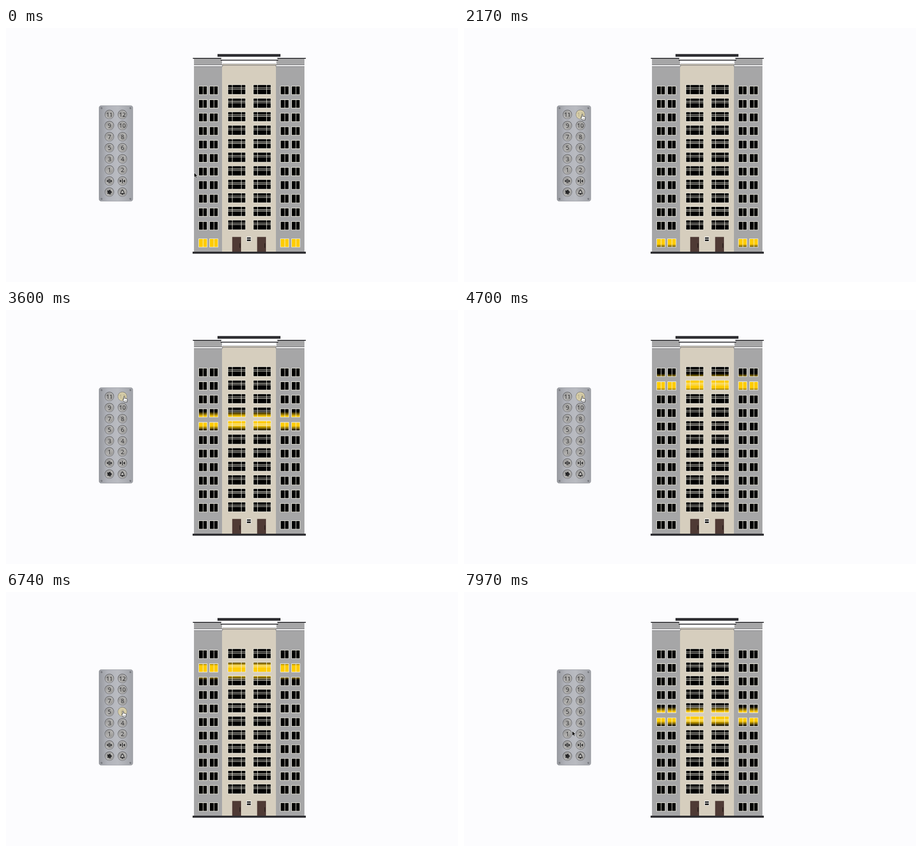
Animation of 998 by 561 pixels, one loop 8000 ms. Source, as an HTML page:

```html
<!DOCTYPE html>
<html lang="en">
<head>
<meta charset="utf-8">
<title>Elevator</title>
<style>
  html, body { margin: 0; width: 100%; height: 100%; overflow: hidden; background: #fcfcfe; }
  svg { display: block; width: 100%; height: 100%; }
  text { font: 13px "Open Sans", "Noto Sans", sans-serif; text-anchor: middle; fill: #202022; letter-spacing: -.3px; }
</style>
</head>
<body>
<svg viewBox="0 0 998 561">
  <defs>
    <linearGradient id="light" gradientUnits="userSpaceOnUse" x1="0" x2="0" y1="-21" y2="21">
      <stop offset="0" stop-color="#fc0" stop-opacity="0"/>
      <stop offset=".25" stop-color="#fc0"/>
      <stop offset=".75" stop-color="#fc0"/>
      <stop offset="1" stop-color="#fc0" stop-opacity="0"/>
    </linearGradient>
    <linearGradient id="steel">
      <stop offset="0" stop-color="#97999f"/>
      <stop offset=".25" stop-color="#b1b3ba"/>
      <stop offset=".55" stop-color="#b9bbc1"/>
      <stop offset="1" stop-color="#a0a2a8"/>
    </linearGradient>
    <linearGradient id="ring" x2="0" y2="1">
      <stop offset="0" stop-color="#4c4c4e"/>
      <stop offset="1" stop-color="#77777a"/>
    </linearGradient>
    <linearGradient id="face" x2="1" y2="1">
      <stop offset="0" stop-color="#8c8c8d"/>
      <stop offset=".5" stop-color="#b3b2b0"/>
      <stop offset="1" stop-color="#8b8a88"/>
    </linearGradient>
  </defs>

  <g id="house">
    <path fill="#a6a6a7" d="M415 67h63v428h-63zM595 67h64v428h-64z"/>
    <path fill="#d6cebe" d="M477 79h119v416H477z"/>
    <path fill="#fff" d="M475 63h125v8H475zM477 72h120v8H477zM415 82h63v3h-63zM596 82h63v3h-63z"/>
    <path fill="none" stroke="#55555a" stroke-width=".8" d="M415 81.5h63v3.500h-63M659 81.500h-63v3.500h63M478 79.500h118M478 82.500h118"/>
    <path fill="#2d2d31" d="M467 57.500h139v6H467zM412.500 66h63v2h-63zM599 66h63v2h-63zM474 70h127v2H474zM412 494h250v4.500H412z"/>
    <path fill="#4f3a35" d="M499.500 461.500H519V494h-19.500zM554.500 461.500H574V494h-19.500z"/>
    <path stroke="#211817" stroke-width="1.500" d="M516.500 475.500v10M571.500 475.500v10"/>
    <path fill="#fff" d="M531 461h10.500v10.500H531z"/>
    <path fill="#111" d="M532 462.500h8.500v3H532zM532 467h8.500v3.500H532z"/>
    <path id="glass" fill="#000"/>
    <path id="glow" fill="url(#light)"/>
    <path id="frames" fill="none" stroke="#f2f0e4" stroke-width="1.100"/>
  </g>

  <g id="panel">
    <rect x="205.500" y="171.500" width="74.500" height="211" rx="4.500" fill="url(#steel)" stroke="#909298" stroke-width=".8"/>
    <g id="screws"/>
    <g id="buttons"/>
  </g>

  <path id="arrow" d="M0 0V10.500L2.500 8.300 4.200 12 6 11.200 4.300 7.600H7.600Z" fill="#000" stroke="#fff" stroke-width=".7"/>
  <g id="hand" fill="#fff" stroke="#111" stroke-width=".8" stroke-linejoin="round">
    <path d="M-1.200 1.200C-1.200-.5 1.100-.5 1.100 1.200V5C1.600 4.200 3 4.400 3.200 5.300 3.800 4.600 5 4.900 5.200 5.900 6 5.400 7 5.800 7 6.900V9.500C7 11 6.200 11.500 6.100 13.200H.4C.2 11.500-2.600 9.800-3.300 7.600-3.500 6.500-2.200 6.400-1.200 7.600Z"/>
    <path fill="none" d="M1.200 9v2.500M3.200 9v2.500M5.100 9v2.500" stroke-width=".5"/>
  </g>
</svg>
<script>
const $ = id => document.getElementById(id);
const LOOP = 8000, RIDE = 4000;
const clamp = x => Math.min(1, Math.max(0, x));
const smooth = x => x * x * (3 - 2 * x);
const mix = (a, b, p) => a + (b - a) * p;

function add(parent, tag, attrs, text) {
  const el = document.createElementNS("http://www.w3.org/2000/svg", tag);
  for (const k in attrs) el.setAttribute(k, attrs[k]);
  if (text) el.textContent = text;
  return parent.appendChild(el);
}

// Windows
let glass = "", frames = "";
function pane(x, y, w, h, cols, rows) {
  const box = `M${x} ${y}h${w}v${h}h${-w}z`;
  glass += box;
  frames += box;
  for (const c of cols) frames += `M${x + c} ${y}v${h}`;
  for (const r of rows) frames += `M${x} ${y + r}h${w}`;
}
for (let i = 0; i < 12; i++) {
  const y = i < 11 ? 128.5 + 29.9 * i : 465.5;
  for (const x of [425.5, 449.5, 606, 630.5]) pane(x, y, 18.5, 18.5, [9.7], []);
  if (i < 11) for (const x of [490, 546]) pane(x, y - 3.2, 39, 21.5, [9.5, 29.5], [6.7, 10]);
}
$("glass").setAttribute("d", glass);
$("glow").setAttribute("d", glass);
$("frames").setAttribute("d", frames);

// Elevator panel
for (const x of [211, 274.5]) for (const y of [177, 377.5]) {
  add($("screws"), "circle", { cx: x, cy: y, r: 1.9, fill: "#66686e" });
  add($("screws"), "path", { d: `M${x - 1.2} ${y + .8}l2.4 -1.6`, stroke: "#c4c5ca", "stroke-width": .6 });
}

const icons = {
  open: "M-1.700-4.500h1.200v9h-1.200zM.5-4.500h1.200v9H.5zM-2.700-3v6L-6 0zM2.700-3v6L6 0z",
  close: "M-.7-4.800H.7v9.600H-.7zM-5.500-3v6L-1.800 0zM5.500-3v6L1.800 0z",
  bell: "M-4.300 3.200C-2.600 1.500-3.500-3.600-.7-4.200-.7-5.500.7-5.500.7-4.200 3.500-3.600 2.600 1.500 4.300 3.200ZM-1.200 4.200H1.200L0 5.300Z"
};
const blade = "M0 0C-2.600-1-2.800-4.800.2-5.200 2.500-5 2.200-3.200.9-2.600Z";

function drawIcon(g, name) {
  if (name === "fan") {
    for (let a = 15; a < 360; a += 72) add(g, "path", { d: blade, fill: "#18181a", transform: `rotate(${a})` });
  } else if (name === "bell") {
    add(g, "path", { d: icons.bell, fill: "none", stroke: "#18181a", "stroke-width": 1.2 });
  } else add(g, "path", { d: icons[name], fill: "#18181a" });
}

const labels = ["11", "12", "9", "10", "7", "8", "5", "6", "3", "4", "1", "2", "open", "close", "fan", "bell"];
const buttons = labels.map((label, i) => {
  const x = i % 2 ? 257 : 228.3, y = 191 + 24.5 * (i >> 1);
  const g = add($("buttons"), "g", { transform: `translate(${x} ${y})` });
  add(g, "circle", { r: 10.3, fill: "url(#ring)" });
  add(g, "circle", { r: 9.2, fill: "#c9c9ca" });
  add(g, "circle", { r: 8.4, fill: "url(#face)" });
  if (+label) add(g, "text", { y: 4.7 }, label);
  else drawIcon(g, label);
  const lit = add(g, "circle", { r: 9.8, fill: "#e6d9a8", opacity: 0 });
  return { x, y, lit };
});

// Cursor stops: start, end, x, y
const home = [415.5, 319.5];
const moves = [[60, 960, 261, 190.5], [5150, 5850, 258.5, 263], [7000, 7750, 239, 307]];
function cursor(t) {
  let [x, y] = home;
  for (const [a, b, tx, ty] of moves) {
    const p = smooth(clamp((t - a) / (b - a)));
    x = mix(x, tx, p);
    y = mix(y, ty, p);
  }
  return [x, y];
}
const over = (b, [x, y]) => Math.hypot(x - b.x, y - b.y) < 10;

// cubic-bezier(.25, .1, .25, 1)
function ease(x) {
  let lo = 0, hi = 1;
  for (let i = 0; i < 24; i++) {
    const s = (lo + hi) / 2;
    if (.75 * s * (1 - s) + s * s * s < x) lo = s; else hi = s;
  }
  return .3 * lo * (1 - lo) ** 2 + 3 * lo * lo * (1 - lo) + lo ** 3;
}

const rides = [[2010, 137], [6110, 317]];
function lightY(t) {
  let y = 475;
  for (const [start, to] of rides) y = mix(y, to, ease(clamp((t - start) / RIDE)));
  return y;
}

const FADE = 400, STEPS = 25;
function draw(t) {
  $("light").setAttribute("gradientTransform", `translate(0 ${lightY(t).toFixed(2)})`);

  // Averaging recent hover states gives a linear fade in and out
  const trail = Array.from({ length: STEPS }, (_, i) => cursor(t - i * FADE / STEPS));
  for (const b of buttons) {
    const level = trail.filter(p => over(b, p)).length / STEPS;
    b.lit.setAttribute("opacity", (level * .72).toFixed(3));
  }

  const pos = trail[0], pointing = buttons.some(b => over(b, pos));
  for (const id of ["arrow", "hand"]) {
    $(id).setAttribute("transform", `translate(${pos[0].toFixed(2)} ${pos[1].toFixed(2)})`);
    $(id).setAttribute("visibility", (id === "hand") === pointing ? "visible" : "hidden");
  }
}

const begin = performance.now();
function tick() {
  draw((performance.now() - begin) % LOOP);
  requestAnimationFrame(tick);
}
tick();
</script>
</body>
</html>
```
